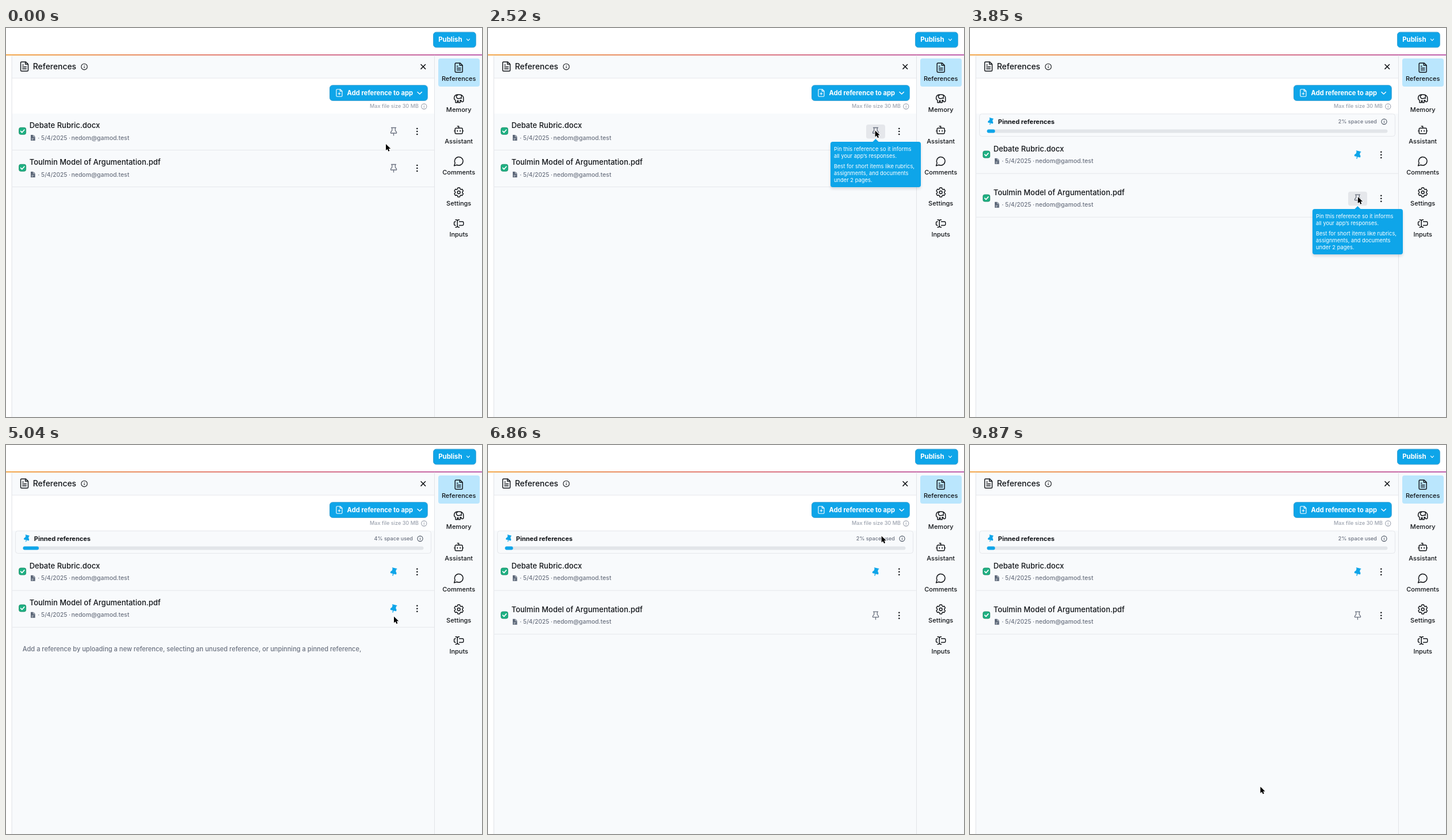
Write an HTML page that moves like this. It is 827 by 677 pixels and loops after 9.94 s.

```html
<!DOCTYPE html>
<html lang="en">
<head>
<meta charset="utf-8">
<title>Pinned references</title>
<style>
html, body { margin: 0; width: 100%; height: 100%; overflow: hidden; background: #fff; }
svg { display: block; width: 827px; height: 677px; font-family: Inter, "Open Sans", sans-serif; font-weight: 500; }
.tip { filter: drop-shadow(0 3px 2px rgba(15, 23, 42, .14)); font-weight: 400; }
.line { fill: none; stroke-linecap: round; stroke-linejoin: round; }
</style>
</head>
<body>
<svg id="stage" viewBox="0 0 827 677"></svg>
<script>
const LOOP = 9940, STEP = 70;
const BLUE = '#0ea5e9', INK = '#111418', GREY = '#6b7280', EDGE = '#e5e7eb', PANEL = '#f8fafc';

const rect = (x, y, w, h, fill, r = 0, more = '') =>
  `<rect x="${x}" y="${y}" width="${w}" height="${h}" rx="${r}" fill="${fill}" ${more}/>`;
const text = (x, y, size, str, fill = INK, more = '') =>
  `<text x="${x}" y="${y}" font-size="${size}" fill="${fill}" ${more}>${str}</text>`;
const line = (d, color = INK, width = 1.4, more = '') =>
  `<path class="line" d="${d}" stroke="${color}" stroke-width="${width}" ${more}/>`;
const group = (id, body, more = '') => `<g id="${id}" ${more}>${body}</g>`;
const icon = (x, y, d, scale = .81, color = INK, width = 1.8) =>
  `<g transform="translate(${x} ${y}) scale(${scale}) translate(-12 -12)">${line(d, color, width)}</g>`;

const info = (x, y, r, color) =>
  `<circle cx="${x}" cy="${y}" r="${r}" fill="none" stroke="${color}" stroke-width="1.1"/>` +
  line(`M${x} ${y - .4}v${r * .48}M${x} ${y - r * .45}v.1`, color, 1.1);

const PAGE = 'M15 2H6a2 2 0 0 0-2 2v16a2 2 0 0 0 2 2h12a2 2 0 0 0 2-2V7zM14 2v5h6M8 9h2M8 13h8M8 17h8';
const MEMORY = 'M9 3h5a8 8 0 0 1 8 8v5a2.5 2.5 0 0 1-5 0v-1h-2v5h-4v-4H9v4H5v-5a5 5 0 0 1-3-5a7 7 0 0 1 7-7z' +
  'M9 4a4 4 0 0 0 4 7c4 1 6-3 4-7M18 11v.1';
const BOT = 'M12 8V4H9M6 8h12a2 2 0 0 1 2 2v8a2 2 0 0 1-2 2H6a2 2 0 0 1-2-2v-8a2 2 0 0 1 2-2zM2 14h2M20 14h2M15 13v2M9 13v2';
const CHAT = 'M7.9 20A9 9 0 1 0 4 16.1L2 22Z';
const INPUT = 'M5 4h1a3 3 0 0 1 3 3 3 3 0 0 1 3-3h1M13 20h-1a3 3 0 0 1-3-3 3 3 0 0 1-3 3H5' +
  'M5 16H4a2 2 0 0 1-2-2v-4a2 2 0 0 1 2-2h1M13 8h7a2 2 0 0 1 2 2v4a2 2 0 0 1-2 2h-7M9 7v10';

function gear() {
  const pts = [];
  for (let k = 0; k < 6; k++) {
    for (const [off, r] of [[-24, 7.6], [-12, 10], [12, 10], [24, 7.6]]) {
      const a = (k * 60 - 90 + off) * Math.PI / 180;
      pts.push(`${(12 + r * Math.cos(a)).toFixed(2)} ${(12 + r * Math.sin(a)).toFixed(2)}`);
    }
  }
  return `M${pts.join('L')}ZM15 12a3 3 0 1 1-6 0a3 3 0 1 1 6 0z`;
}

const PIN = 'M-4-6.5H4M-2.8-6.5V-1.5L-5 1.2V3H5V1.2L2.8-1.5V-6.5M0 3V7';
const solidPin = (x, y, scale = .93) =>
  `<g transform="translate(${x} ${y}) rotate(14) scale(${scale})">` +
  `<path class="line" d="${PIN}" style="fill:${BLUE}" stroke="${BLUE}" stroke-width="1.5"/></g>`;

function row(id, top, name) {
  const y = top + 31;
  return group(id,
    rect(22.6, y - 6.7, 12, 12, '#1fb183', 3, 'stroke="#12845f" stroke-width=".8"') +
    line(`M25.6 ${y - .5}l2.2 2.3 4-4.6`, '#fff', 1.7) +
    text(40.7, top + 25, 13, name) +
    `<path d="M43 ${y + 6}h4.6l3 3v7h-7.6z" fill="#5b6677"/>` +
    line(`M47.4 ${y + 6.2}v3h3M44.8 ${y + 12.4}h3.2M44.8 ${y + 14.3}h2`, '#dfe3e8', .8) +
    text(55.3, top + 45.7, 10.1, '· 5/4/2025 ·', GREY) +
    text(113.6, top + 45.7, 10.4, 'nedom@gamod.test', GREY) +
    rect(657, y - 12, 33, 24.5, '#e5e7eb', 4, `id="${id}Hover"`) +
    line(PIN, GREY, 1.3, `id="${id}Open" transform="translate(673.5 ${y})"`) +
    group(id + 'Solid', solidPin(673.6, y)) +
    [-5, 0, 5].map(d => `<circle cx="714.3" cy="${y + d}" r="1.3" fill="${INK}"/>`).join('') +
    rect(11, top + 63, 733, 1, EDGE));
}

// Each tip is laid out from its top edge; a leading bar starts a new paragraph.
function tip(id, x, top, height, arrow, pad, lines) {
  let y = top + 15.5;
  const body = lines.map(s => {
    if (s[0] === '|') { y += 6; s = s.slice(1); }
    const out = text(x + pad, y, 9.35, s, '#fff');
    y += 12;
    return out;
  }).join('');
  return group(id, rect(x, top, 157, height, BLUE, 4) +
    `<path d="M${arrow - 5.5} ${top + .5}l5.5-5.5 5.5 5.5z" fill="${BLUE}"/>` + body, 'class="tip"');
}

const button = (x, y, w, h) => rect(x, y, w, h, BLUE, 5, 'stroke="#3fa2d2"');
const side = [['References', PAGE], ['Memory', MEMORY], ['Assistant', BOT],
  ['Comments', CHAT], ['Settings', gear()], ['Inputs', INPUT]];

const useLines = ['Using 2% of available pinned', 'reference space.', '|Click to unpin this reference.',
  'Once removed, your app will', 'only use this reference as', 'needed'];

const stage = document.getElementById('stage');
stage.innerHTML =
  '<defs><linearGradient id="bar"><stop stop-color="#f0921e"/><stop offset=".5" stop-color="#dc5c58"/>' +
  '<stop offset="1" stop-color="#b03a9c"/></linearGradient></defs>' +
  rect(0, 0, 827, 677, '#fff') +
  rect(10, 47, 817, 40, PANEL) + rect(10, 149, 735, 528, PANEL) + rect(745, 47, 82, 630, PANEL) +
  rect(0, 46, 827, 1.6, 'url(#bar)') +
  rect(9.6, 47.5, 1, 630, '#dfe2e6') + rect(744, 47.5, 1, 630, '#e1e4e8') + rect(10, 86.7, 734, 1, EDGE) +
  button(742.5, 7.2, 73.8, 26.6) + text(751.2, 24.4, 11.4, 'Publish', '#fff', 'font-weight="700"') +
  line('M800.4 19.2l2.6 2.6 2.6-2.6', '#fff', 1.1) +
  icon(32, 67, PAGE) + text(46.8, 72.2, 13.9, 'References') + info(136, 67.4, 5.2, INK) +
  line('M721 63.5l7.6 7.6M728.6 63.5l-7.6 7.6', INK, 1.5) +
  button(562.5, 99.7, 169.8, 26.7) +
  icon(579, 113, 'M15 2H6a2 2 0 0 0-2 2v16a2 2 0 0 0 2 2h12a2 2 0 0 0 2-2V7zM14 2v5h6M9 14h6M12 11v6', .63, '#fff') +
  text(592.6, 117, 11.2, 'Add reference to app', '#fff', 'font-weight="700"') +
  line('M715 111.4l3.7 3.7 3.7-3.7', '#fff', 1.4) +
  text(632, 139.4, 9.1, 'Max file size 30 MB', '#9ca3af') + info(726.3, 136.5, 4.6, '#9ca3af') +
  rect(751, 53, 72, 49, '#bae6fd', 4) +
  side.map(([name, d], i) => icon(786.7, 69 + 54.25 * i, d) +
    text(786.7, 92.2 + 54.25 * i, 11, name, INK, 'text-anchor="middle"')).join('') +
  group('card', rect(16.5, 149.5, 722, 39, PANEL, 4, `stroke="${EDGE}"`) +
    solidPin(36, 162.5, .8) + text(48.8, 166.7, 11, 'Pinned references', INK, 'font-weight="650"') +
    text(707, 166.4, 9.1, '', GREY, 'id="used" text-anchor="end"') + info(719.5, 163, 4.6, '#4b5563') +
    rect(29.5, 176.6, 696, 5.8, '#e2e5e9', 2.9) + rect(29.5, 176.6, 14, 5.8, BLUE, 2.9, 'id="fill"')) +
  row('first', 149, 'Debate Rubric.docx') + row('second', 213, 'Toulmin Model of Argumentation.pdf') +
  text(28.8, 359, 11.05, 'Add a reference by uploading a new reference, selecting an unused reference, ' +
    'or unpinning a pinned reference,', GREY, 'id="hint"') +
  tip('pinTip', 595, 198, 79, 673.5, 6, ['Pin this reference so it informs', 'all your app’s responses.',
    '|Best for short items like rubrics,', 'assignments, and documents', 'under 2 pages.']) +
  tip('useTip', 595, 239, 90.5, 673.5, 6, useLines) +
  tip('limitTip', 641, 175.3, 72.6, 719.5, 12, ['Models have limits on the', 'amount of text they can',
    'process at once and as a', 'result pinned reference', 'space is limited.']) +
  group('cursor', '<path d="M0 0V11L2.6 8.7 4.4 12.7 6.4 11.8 4.7 7.9H8.2Z" fill="#000" stroke="#fff" paint-order="stroke" stroke-width="1.4"/>');

const el = {};
stage.querySelectorAll('[id]').forEach(n => el[n.id] = n);

// time, x, y of the pointer tip
const path = [
  [0, 660, 202], [70, 660, 202], [280, 663, 182], [350, 663, 182], [560, 672, 181], [2240, 672, 181],
  [2380, 672.6, 178.5], [3220, 672.6, 178.5], [3570, 674, 294], [4480, 674, 294], [4760, 674, 298.5],
  [5110, 674, 298.5], [5390, 675, 288], [5740, 675, 288], [5810, 656, 265], [5880, 656, 265],
  [5950, 666, 222], [6020, 651, 175], [6160, 640, 163], [6230, 640, 163], [6370, 428, 161],
  [6440, 428, 161], [7000, 731, 158], [7210, 731, 158], [7420, 719, 162], [7700, 719, 162],
  [7840, 720, 161], [9520, 720, 161], [9870, 504.5, 594.8]
];

function pointer(t) {
  let i = 0;
  while (i < path.length - 2 && t > path[i + 1][0]) i++;
  const [t0, x0, y0] = path[i], [t1, x1, y1] = path[i + 1];
  const p = Math.min(1, (t - t0) / (t1 - t0));
  const e = p * p * (3 - 2 * p);
  return [x0 + (x1 - x0) * e, y0 + (y1 - y0) * e];
}

const clamp = v => Math.max(0, Math.min(1, v));
const fade = (t, from, full, end, gone = end) =>
  t >= gone ? 0 : clamp((t - from) / (full - from)) * (t < end ? 1 : clamp((gone - t) / (gone - end)));
const show = (node, alpha) => {
  node.style.opacity = alpha;
  node.style.visibility = alpha > 0 ? 'visible' : 'hidden';
};
const move = (node, x, y) => node.setAttribute('transform', `translate(${x} ${y})`);

function draw(time) {
  const t = Math.floor(time % LOOP / STEP) * STEP;
  const pins = t < 2870 ? 0 : t >= 5040 && t < 6090 ? 2 : 1;

  show(el.card, pins ? 1 : 0);
  el.used.textContent = `${pins * 2}% space used`;
  el.fill.setAttribute('width', pins === 2 ? 27.5 : 14);
  show(el.hint, pins === 2 ? 1 : 0);

  move(el.first, 0, pins ? 40.7 : 0);
  move(el.second, 0, [0, 52.7, 40.7][pins]);
  [['first', pins > 0], ['second', pins > 1]].forEach(([id, on]) => {
    show(el[id + 'Solid'], on ? 1 : 0);
    show(el[id + 'Open'], on ? 0 : 1);
  });
  show(el.firstHover, fade(t, 910, 1120, 2870) + fade(t, 5880, 5950, 6160));
  show(el.secondHover, fade(t, 3430, 3570, 5040) + fade(t, 5180, 5390, 5950));

  move(el.pinTip, 0, t > 2870 ? 117 : 0);
  show(el.pinTip, fade(t, 1190, 1330, 2870) + fade(t, 3570, 3850, 5040));
  move(el.useTip, 0, t < 5950 ? 64 : 0);
  show(el.useTip, fade(t, 5460, 5670, 5950) + fade(t, 5880, 5950, 6090, 6160));
  show(el.limitTip, fade(t, 7350, 7630, 9590, 9800));

  move(el.cursor, ...pointer(t));
}

const start = performance.now();
function tick() {
  draw(performance.now() - start);
  requestAnimationFrame(tick);
}
tick();
</script>
</body>
</html>
```
